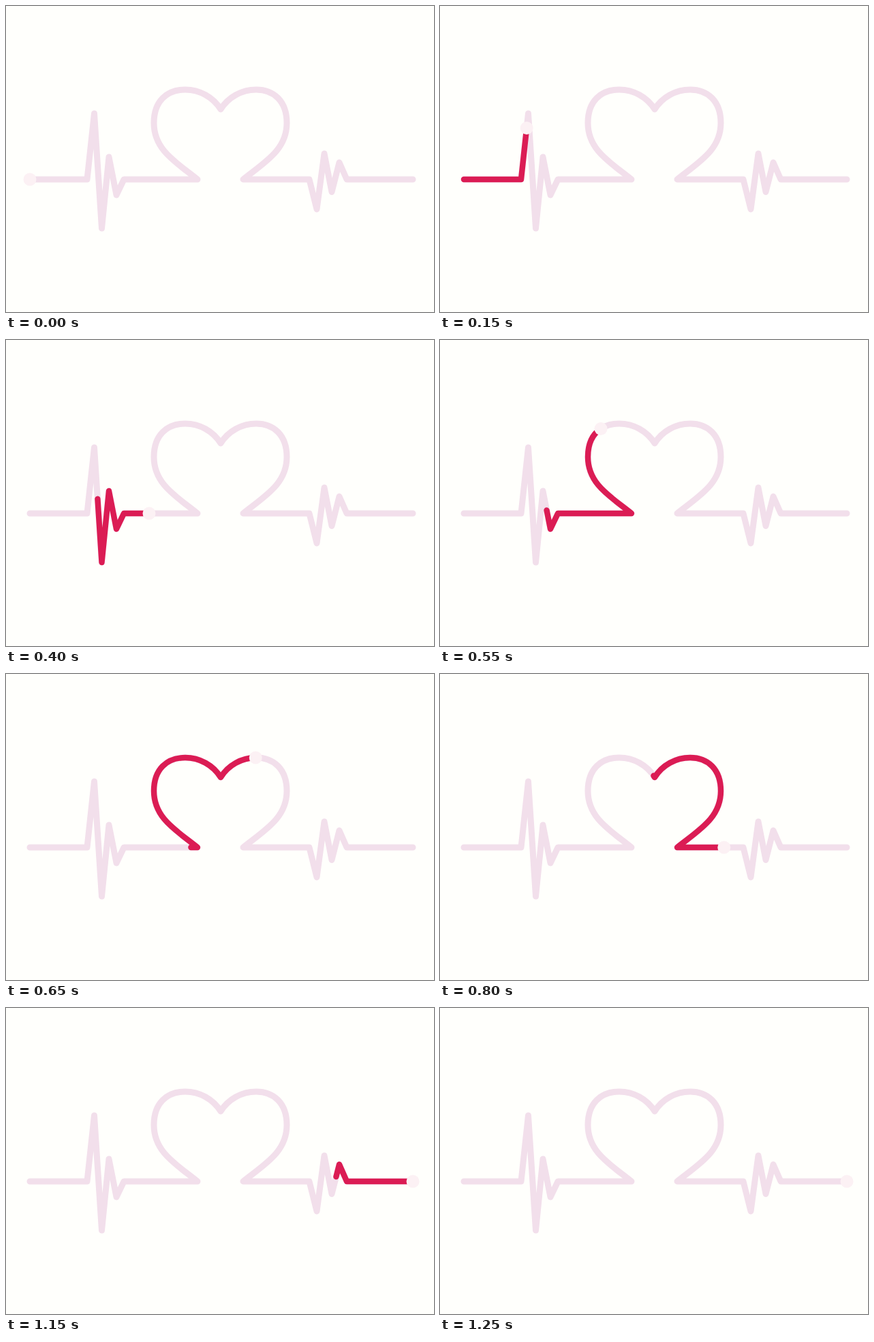
Write an HTML page that moves like this. It is 628x450 px and loops after 1.3 s.

```html
<!DOCTYPE html>
<html lang="en">
<head>
<meta charset="utf-8">
<title>Heartbeat</title>
<style>
  html, body { margin: 0; width: 100%; height: 100%; overflow: hidden; background: #fffffc; }
  svg { display: block; width: 628px; height: 450px; }
  path { fill: none; stroke-width: 9; stroke-linecap: round; stroke-linejoin: round; }
  #pulse { stroke-width: 8.4; }
</style>
</head>
<body>
<svg viewBox="0 0 628 450">
  <path id="track" stroke="#f2dfeb" d="M35 255H119L129.5 158L140.5 327L151 222L162 278L173 255H281
    C250 230 217 212 217 172C217 140 236 123 263 123C284 123 304 134 315 152
    C326 134 346 123 367 123C393 123 412 140 412 172C412 212 379 230 348 255
    H445L456 299L467 217L478 273.5L489 230L500 255H597"/>
  <path id="pulse" stroke="#db1c54"/>
  <circle id="dot" r="9.5" fill="#fcf1f4"/>
</svg>
<script>
  const LOOP = 1300, STEP = 50;
  const track = document.getElementById('track');
  const pulse = document.getElementById('pulse');
  const dot = document.getElementById('dot');
  pulse.setAttribute('d', track.getAttribute('d'));

  const total = track.getTotalLength();
  const span = total / 5;
  // time in ms, distance travelled by the head in px
  const keys = [[50, 0], [150, 160], [400, 576], [650, 956], [800, 1210],
                [1000, total - 64], [1240, total + span]];

  function headAt(t) {
    if (t <= keys[0][0]) return 0;
    for (let i = 1; i < keys.length; i++) {
      const [t0, d0] = keys[i - 1], [t1, d1] = keys[i];
      if (t <= t1) return d0 + (d1 - d0) * (t - t0) / (t1 - t0);
    }
    return total + span;
  }

  function draw(time) {
    const t = Math.floor((time % LOOP) / STEP) * STEP;
    const head = headAt(t);
    const from = Math.max(0, head - span);
    const to = Math.min(total, head);
    const len = to - from;
    pulse.style.display = len > 0.5 ? '' : 'none';
    pulse.setAttribute('stroke-dasharray', `${len} ${total * 2}`);
    pulse.setAttribute('stroke-dashoffset', -from);
    const p = track.getPointAtLength(to);
    dot.setAttribute('cx', p.x);
    dot.setAttribute('cy', p.y);
  }

  const start = performance.now();
  function tick() {
    draw(performance.now() - start);
    requestAnimationFrame(tick);
  }
  tick();
</script>
</body>
</html>
```
